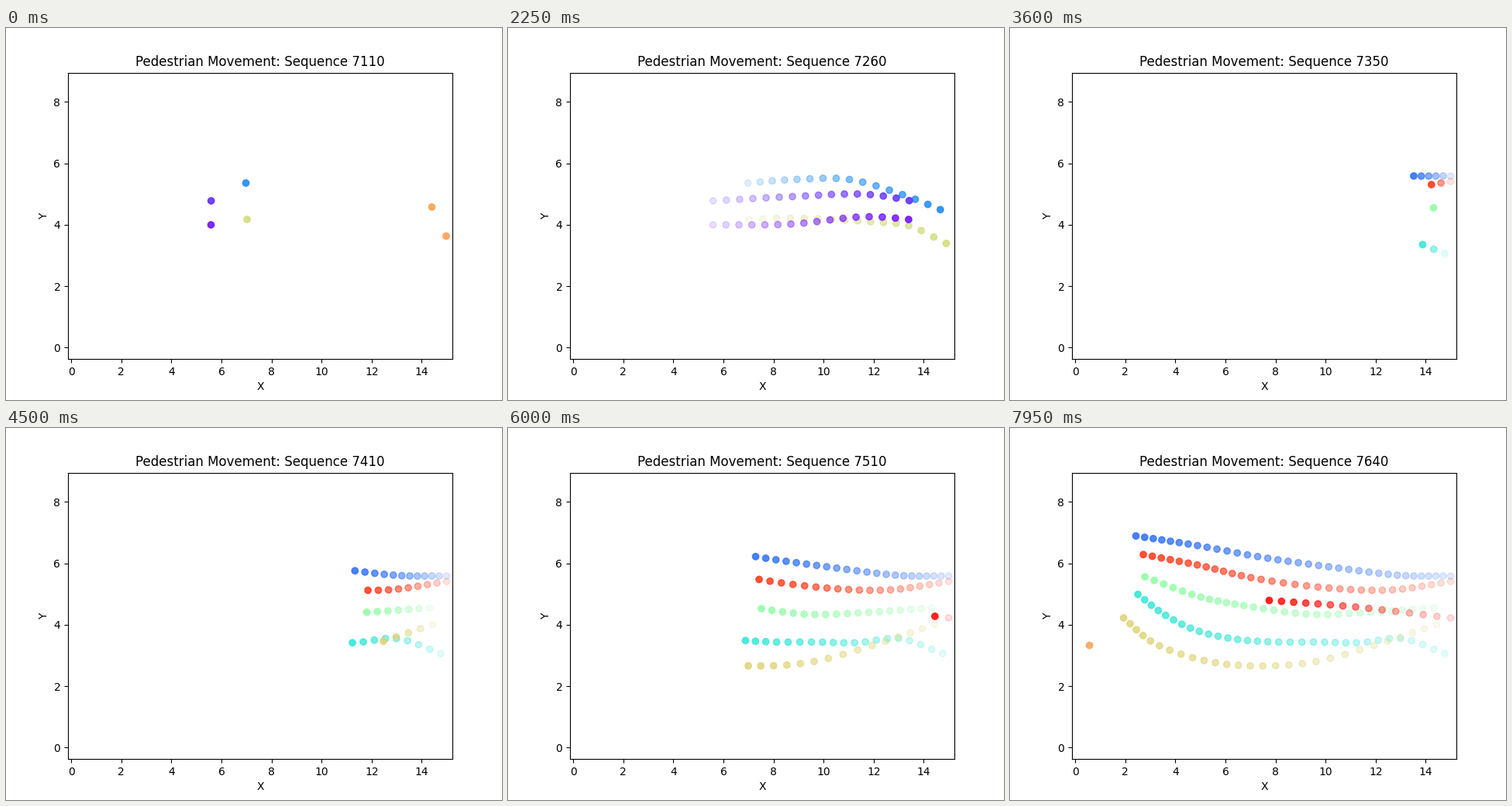
Animation of 640x480 px, one loop 8 s. Source, as a matplotlib script:

```python
import numpy as np
import matplotlib.pyplot as plt
from matplotlib.animation import FuncAnimation

TICK = 50                # ms per animation frame
TICKS_PER_STEP = 3       # a new observation every 150 ms
TOTAL_TICKS = 160
FIRST_SEQUENCE = 7110
OLDEST_ALPHA, NEWEST_ALPHA = 0.14, 0.9

# Axes box and data origin in stage pixels, and pixels per axis unit
LEFT, RIGHT, TOP, BOTTOM = 80, 576, 57.6, 427.2
ORIGIN = np.array([84.19, 412.38])
SCALE = np.array([32.3, -39.62])


def to_axis(pixels):
    return (np.asarray(pixels) - ORIGIN) / SCALE


def smooth_path(keys, t):
    """Cubic Hermite curve through evenly timed key points."""
    slopes = np.gradient(keys, axis=0)
    i = np.minimum(t.astype(int), len(keys) - 2)
    u = (t - i)[:, None]
    blend = u * u * (3 - 2 * u)
    return (keys[i] * (1 - blend) + keys[i + 1] * blend
            + slopes[i] * u * (1 - u) ** 2 - slopes[i + 1] * u * u * (1 - u))


class Walker:
    """A pedestrian passing one key point (stage pixels) every `stride` steps."""

    def __init__(self, hue, first, stride, *keys):
        keys = np.array(keys, float)
        self.first = first
        self.count = int(stride * (len(keys) - 1) + 1e-6) + 1
        self.path = to_axis(smooth_path(keys, np.arange(self.count) / stride))
        self.color = plt.cm.rainbow(hue)

    def trail(self, step):
        """Positions and colours so far; empty unless the walker is present."""
        seen = step - self.first + 1
        if not 0 < seen <= self.count:
            seen = 0
        colors = np.tile(self.color, (seen, 1))
        colors[:, 3] = np.linspace(NEWEST_ALPHA, OLDEST_ALPHA, seen)[::-1]
        return self.path[:seen], colors


walkers = [
    # leaving on the right
    Walker(0.78, 0, 1, (549.5, 231), (566, 230)),
    Walker(0.785, 0, 0.5, (568, 268.5), (576, 268)),
    Walker(0.665, 0, 3, (311, 247), (364.5, 245.5), (417.5, 247), (468, 250),
           (517, 255), (565.5, 278)),
    Walker(0.185, 0, 4, (309.5, 200), (373, 195.3), (440.5, 195.5),
           (509, 215), (574, 241)),
    Walker(0.06, 0, 6, (264.7, 223), (367, 217.5), (467.5, 215), (568, 233)),
    Walker(0.03, 0, 6, (264.5, 254), (365, 253), (466, 243.5), (568, 253)),
    # coming in from the right
    Walker(0.15, 19, 6.8, (568.5, 191), (502, 190), (416.4, 179.7),
           (327.4, 167.2), (239.5, 151.3), (162.5, 139.3)),
    Walker(0.92, 22, 6.2, (568.5, 198), (491, 209), (406, 206),
           (316, 194), (244, 177.2), (172, 163.3)),
    Walker(0.54, 24, 5.8, (546.5, 232), (468.3, 237.6), (387.6, 240.4),
           (309, 230.2), (244, 217.5), (174, 192)),
    Walker(0.36, 22, 3.875, (561, 291), (505.7, 271.8), (450.5, 277),
           (397, 276.2), (339.5, 276), (289, 272.2), (241.4, 261.5),
           (199.6, 241), (165, 214.7)),
    Walker(0.685, 26, 4.5, (550.5, 253.5), (478.5, 277.8), (395, 301.3),
           (318, 307), (250.5, 300), (186.8, 278), (146.5, 245)),
    Walker(0.98, 39, 7, (568.5, 245), (446, 231), (334.5, 222.5)),
    # coming in from the left
    Walker(0.775, 53, 1, (102.5, 280.5), (119, 280)),
]

fig, ax = plt.subplots(figsize=(6.4, 4.8), dpi=100)
(x_min, y_min), (x_max, y_max) = to_axis([(LEFT, BOTTOM), (RIGHT, TOP)])
ax.set(xlim=(x_min, x_max), ylim=(y_min, y_max), xlabel="X", ylabel="Y")
title = ax.set_title("")
dots = ax.scatter([], [])


def update(tick):
    step = tick // TICKS_PER_STEP
    points, colors = zip(*(w.trail(step) for w in walkers))
    colors = np.vstack(colors)
    dots.set_offsets(np.vstack(points))
    dots.set_facecolor(colors)
    dots.set_edgecolor(colors)
    title.set_text(f"Pedestrian Movement: Sequence {FIRST_SEQUENCE + 10 * step}")
    return dots, title


anim = FuncAnimation(fig, update, frames=TOTAL_TICKS, interval=TICK,
                     repeat=True, repeat_delay=0, blit=False)
plt.show()
```
